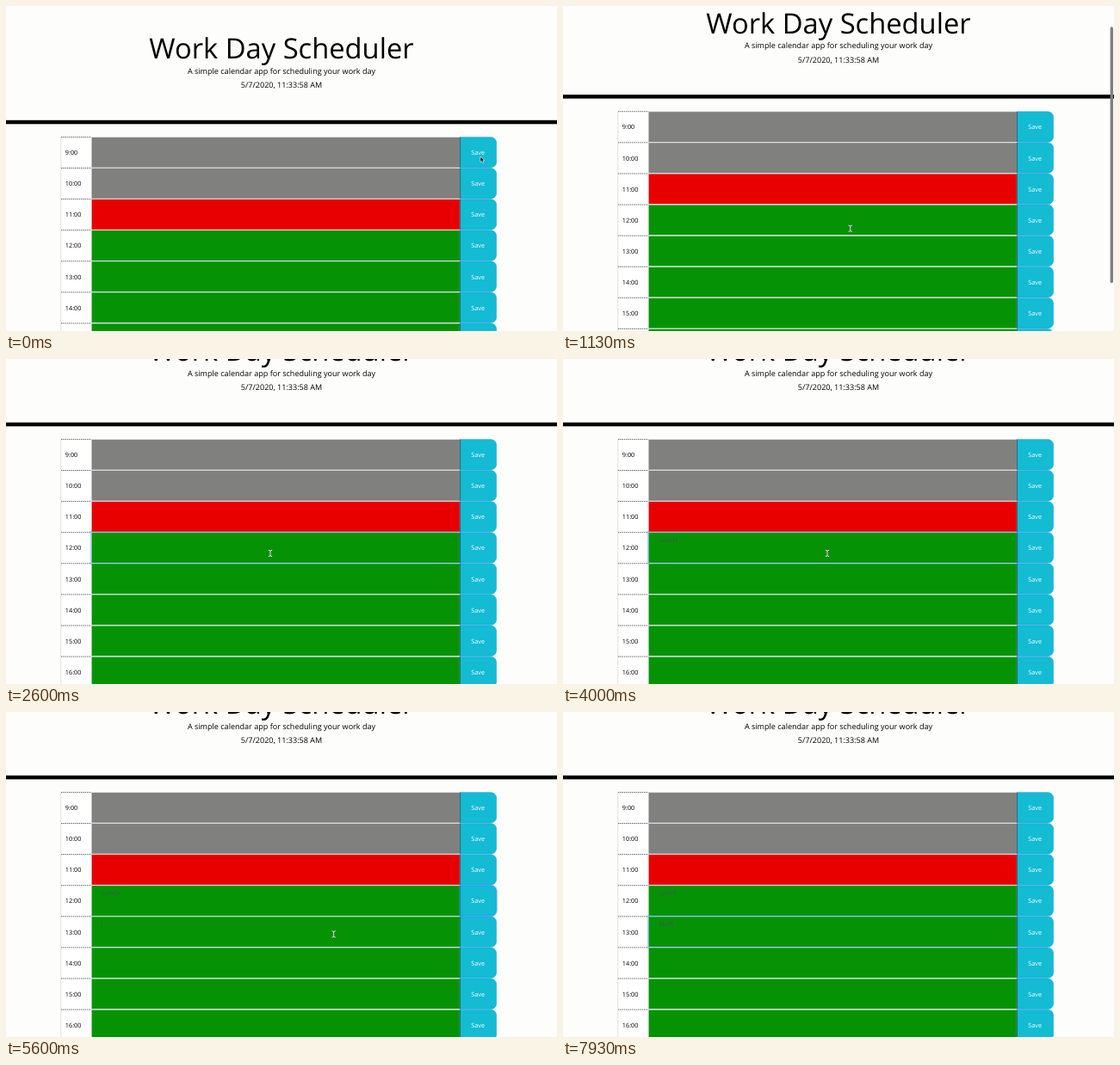
These frames come from a looping animation (640x378 px, 8000 ms). An HTML page:

```html
<!DOCTYPE html>
<html lang="en">
<head>
<meta charset="utf-8">
<title>Work Day Scheduler</title>
<style>
  html, body { margin: 0; width: 100%; height: 100%; overflow: hidden; background: #fdfdfb; }
  svg { display: block; width: 640px; height: 378px; }
  text { font-family: "Open Sans", sans-serif; text-rendering: geometricPrecision; white-space: pre; }
  .head { font-size: 9.05px; text-anchor: middle; }
  .small { font-size: 7.3px; }
</style>
</head>
<body>
<svg id="stage" viewBox="0 0 640 378">
  <rect width="640" height="378" fill="#fdfdfb"/>
  <g id="page">
    <text class="head" x="320" y="61.2" style="font-size:32.7px">Work Day Scheduler</text>
    <text class="head" x="320" y="79">A simple calendar app for scheduling your work day</text>
    <text class="head" x="320" y="95.2">5/7/2020, 11:33:58 AM</text>
    <rect y="132.8" width="640" height="4.5"/>
  </g>
  <rect id="thumb" x="635.6" width="3.4" height="298" rx="1.7" fill="#7f7f7f"/>
  <g id="cursor">
    <path id="arrow" d="M0 0V6.6L1.6 5.2 2.7 7.6 3.9 7 2.8 4.7H4.8Z" fill="#111" stroke="#fff" stroke-width=".6"/>
    <g id="ibeam" fill="none" stroke-linecap="round">
      <path d="M-1.8-3.6Q0-3.6 0-2.6Q0-3.6 1.8-3.6M0-2.6V2.6M-1.8 3.6Q0 3.6 0 2.6Q0 3.6 1.8 3.6" stroke="#35603a" stroke-width="1.7"/>
      <path d="M-1.8-3.6Q0-3.6 0-2.6Q0-3.6 1.8-3.6M0-2.6V2.6M-1.8 3.6Q0 3.6 0 2.6Q0 3.6 1.8 3.6" stroke="#f4f4f4" stroke-width=".9"/>
    </g>
    <path id="hand" d="M-1.4-3.4Q-.7-4.2 0-3.4L.6-1.1 2.3-.7 3.5 0 3.3 2.2 2.5 4.2H-.9L-2.6 1.9-3.4.3Q-2.8-.4-2 .3L-1 1Z" fill="#fff" stroke="#222" stroke-width=".6" stroke-linejoin="round"/>
  </g>
</svg>
<script>
const LOOP = 8000, STEP = 200 / 3;
const TOP = 152.2, PITCH = 36.1, ROWS = 9;
const $ = id => document.getElementById(id);
const page = $("page");

function add(tag, attrs, text) {
  const el = document.createElementNS("http://www.w3.org/2000/svg", tag);
  set(el, attrs);
  if (text) el.textContent = text;
  page.appendChild(el);
  return el;
}
function set(el, attrs) {
  for (const k in attrs) el.setAttribute(k, attrs[k]);
}
const show = (el, on) => set(el, { visibility: on ? "visible" : "hidden" });
const clamp = v => Math.max(0, Math.min(1, v));
const rowTop = i => TOP + PITCH * i;

// Right side rounded, left side square
function buttonPath(y) {
  const l = 527.3, r = 569.7, c = 6.6, h = PITCH - .5;
  return `M${l} ${y + .25}H${r - c}a${c} ${c} 0 0 1 ${c} ${c}v${h - 2 * c}a${c} ${c} 0 0 1 ${-c} ${c}H${l}Z`;
}

const fields = [], buttons = [];
for (let i = 0; i < ROWS; i++) {
  const y = rowTop(i), mid = y + 20.9;
  add("rect", { x: 64, y, width: 35, height: PITCH, fill: "#fff" });
  add("path", { d: `M63.8 ${y}v${PITCH}`, stroke: "#c9c9c9", "stroke-width": .6 });
  add("path", { d: `M64 ${y + .2}h35`, stroke: "#111", "stroke-width": .65, "stroke-dasharray": "1.4 .9" });
  add("text", { class: "small", x: 68.8, y: mid }, 9 + i + ":00");
  fields.push(add("rect", {
    x: 99.2, y: y + .3, width: 428, height: PITCH - .6,
    fill: i < 2 ? "#80807e" : i == 2 ? "#e80000" : "#059305",
    stroke: "#dde2e4", "stroke-width": .7
  }));
  buttons.push(add("path", { d: buttonPath(y), fill: "#13bbd3", stroke: "#2f94ea", "stroke-width": .45 }));
  add("path", { d: `M527.4 ${y + .5}v${PITCH - 1}`, stroke: "#10262b", "stroke-width": .6 });
  add("text", { class: "small", x: 548.2, y: mid, "text-anchor": "middle", fill: "#fff" }, "Save");
}
const fieldGlow = add("rect", { x: 98.3, width: 429.8, height: PITCH + 1.4, fill: "none", stroke: "#007bff", "stroke-width": 1.45 });
const buttonGlow = add("path", { d: buttonPath(rowTop(3)), fill: "none", stroke: "#268fff", "stroke-width": 2.4 });

// Each entry: row, typed word, time of every letter, focus span, caret spans
const entries = [
  { row: 3, word: "Lunch", keys: [2860, 3060, 3200, 3330, 3530], focus: [2100, 4780],
    caret: [[2100, 2600], [2860, 4030], [4530, 4780]] },
  { row: 4, word: "Stuff", keys: [7460, 7590, 7660, 7790, 7920], focus: [5560, 9000],
    caret: [[5560, 6060], [6530, 7060], [7460, 8000]] }
];
for (const e of entries) {
  const y = rowTop(e.row);
  e.text = add("text", { class: "small", x: 111.3, y: y + 11.3, fill: "#495057" });
  e.line = add("rect", { y: y + 4.6, width: .5, height: 8.4, fill: "#495057" });
}

// Time, x, y
const path = [
  [0, 551, 175], [60, 547, 178], [200, 500, 208], [400, 375, 251], [600, 334, 259],
  [1130, 334, 259], [1330, 318, 244], [1530, 309, 233], [1730, 309, 233],
  [2060, 307, 226], [4000, 307, 226], [4200, 352, 231], [4400, 460, 231],
  [4600, 530, 226], [4800, 541, 223], [5130, 541, 223], [5330, 470, 241],
  [5530, 385, 258], [5860, 364.5, 260], [8000, 364.5, 260]
];
const scrollKeys = [[866, 0], [930, 3], [1000, 10], [1130, 29.3], [1330, 51], [1530, 59]];

function track(keys, t, col) {
  const n = keys.findIndex(k => k[0] > t);
  if (n < 0) return keys[keys.length - 1][col];
  if (n == 0) return keys[0][col];
  const a = keys[n - 1], b = keys[n];
  return a[col] + (b[col] - a[col]) * (t - a[0]) / (b[0] - a[0]);
}
const within = (t, [a, b]) => t >= a && t < b;
const fade = (t, [a, b]) => clamp((t - a) / 150) - clamp((t - b) / 150);

function tint(v) {
  const from = [19, 187, 211], to = [8, 105, 210];
  return `rgb(${from.map((c, i) => Math.round(c + (to[i] - c) * v))})`;
}

function draw(time) {
  const t = Math.floor((time % LOOP + 7) / STEP) * STEP;
  const scroll = track(scrollKeys, t, 1);
  set(page, { transform: `translate(0 ${-scroll})` });
  set($("thumb"), { y: scroll * .815, opacity: t < 920 ? 0 : 1 - clamp((t - 1980) / 270) });

  set(buttons[0], { fill: tint(fade(t, [20, 130])) });
  set(buttons[3], { fill: tint(fade(t, [4560, 5180])) });
  set(buttonGlow, { opacity: .5 * fade(t, [4780, 5560]) });

  let glow = 0;
  for (const e of entries) {
    const f = fade(t, e.focus);
    set(fields[e.row], { stroke: f > .5 ? "#9fcdf2" : "#dde2e4" });
    if (f > 0) {
      glow = f;
      set(fieldGlow, { y: rowTop(e.row) - .7 });
    }
    e.text.textContent = e.word.slice(0, e.keys.filter(k => k <= t + 7).length);
    set(e.line, { x: 111.4 + e.text.getComputedTextLength() });
    show(e.line, e.caret.some(c => within(t + 7, c)));
  }
  set(fieldGlow, { opacity: .25 * glow });

  const x = track(path, t, 1), y = track(path, t, 2);
  const typing = within(t + 7, [2860, 3800]) || t + 7 >= 7460;
  const overButton = x > 527;
  set($("cursor"), { transform: `translate(${x} ${y})` });
  show($("arrow"), t < 60);
  show($("hand"), t >= 60 && overButton);
  show($("ibeam"), !overButton && !typing);
}

const start = performance.now();
function tick(now) {
  draw(Math.max(0, now - start));
  requestAnimationFrame(tick);
}
draw(0);
requestAnimationFrame(tick);
</script>
</body>
</html>
```
